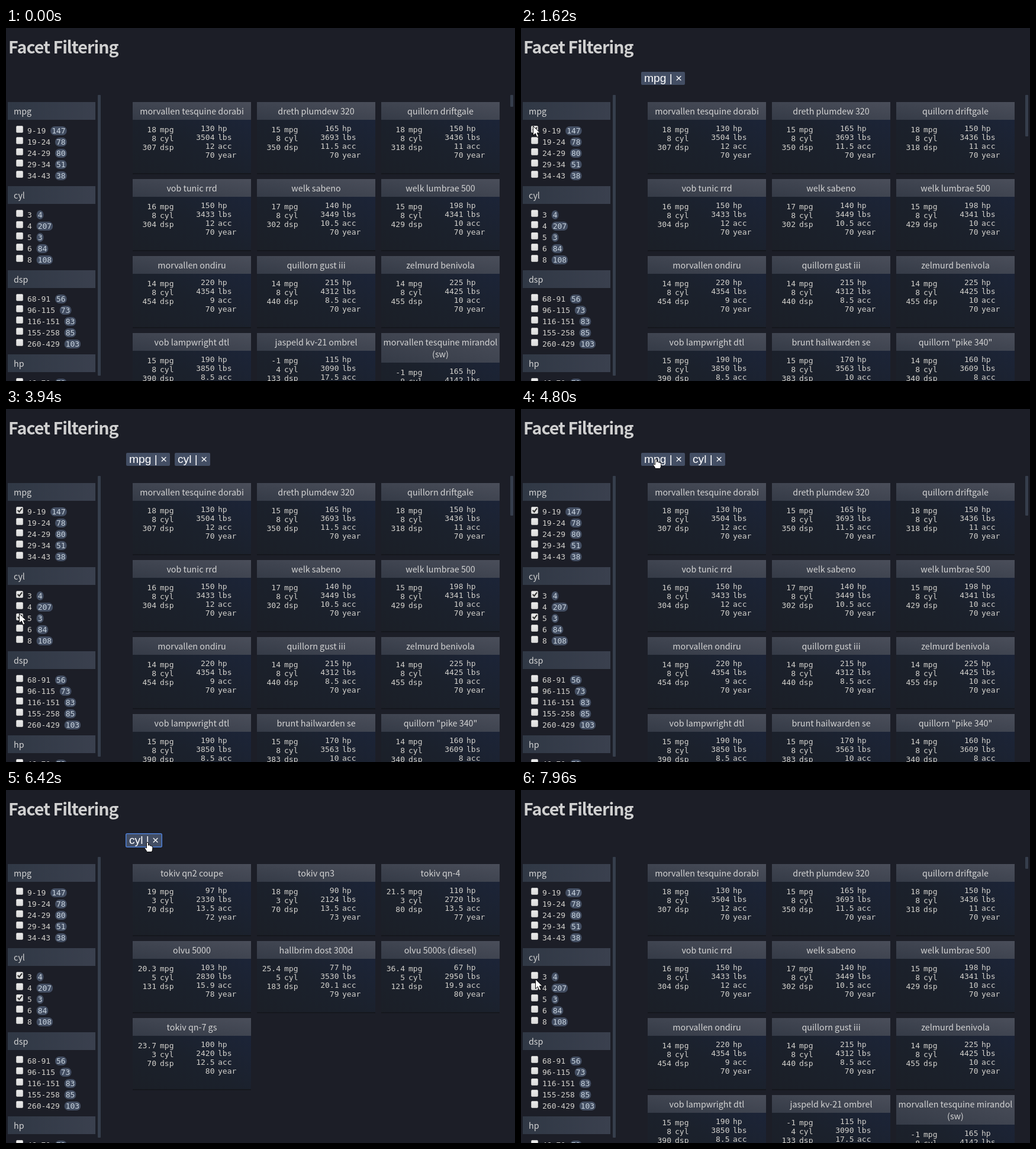
Write an HTML page that moves like this. It is 860 px wide and 596 px high and loops after 8 s.

```html
<!DOCTYPE html>
<html lang="en">
<head>
<meta charset="utf-8">
<title>Facet Filtering</title>
<style>
  html, body { margin: 0; width: 100%; height: 100%; overflow: hidden; background: #1c1e27; }
  svg { display: block; width: 860px; height: 596px; }
  text { fill: #d3d1cc; font: 13px "DejaVu Sans Mono", monospace; white-space: pre; }
  .title, .heading { font-family: "Noto Sans CJK JP", "Noto Sans CJK SC", "Noto Sans CJK", sans-serif; }
  .heading { font-size: 28.6px; font-weight: 700; letter-spacing: -1px; fill: #d0d0d0; }
  .title { font-size: 14.3px; fill: #d4d4d4; }
  .middle { text-anchor: middle; }
  .end { text-anchor: end; }
  .chip { font: 19.2px "Liberation Sans", Arial, sans-serif; fill: #fff; }
  .count { fill: #c8d3de; }
</style>
</head>
<body>
<svg id="stage" viewBox="0 0 860 596">
  <defs>
    <linearGradient id="side"><stop stop-color="#303845"/><stop offset="1" stop-color="#3a404e"/></linearGradient>
    <linearGradient id="head" x1="0" y1="1" x2="1" y2="0"><stop stop-color="#353b47"/><stop offset="1" stop-color="#4a4e5a"/></linearGradient>
    <linearGradient id="body" x1="0" y1="1" x2="1" y2="0"><stop stop-color="#1b1f27"/><stop offset=".45" stop-color="#1b212c"/><stop offset="1" stop-color="#1c253b"/></linearGradient>
    <linearGradient id="box" x2="0" y2="1"><stop stop-color="#ececec"/><stop offset="1" stop-color="#dadada"/></linearGradient>
  </defs>
</svg>
<script>
const LOOP = 8000;
const stage = document.getElementById("stage");
const timed = [];

function add(parent, tag, attrs, content) {
  const el = document.createElementNS("http://www.w3.org/2000/svg", tag);
  for (const key in attrs) el.setAttribute(key, attrs[key]);
  if (content !== undefined) el.textContent = content;
  return parent.appendChild(el);
}
const group = (attrs = {}) => add(stage, "g", attrs);
const rect = (g, x, y, width, height, fill, rx = 0) => add(g, "rect", { x, y, width, height, fill, rx });
const write = (g, x, y, content, style = "") => add(g, "text", { x, y, class: style }, content);

// Visible from one time to another; a window with from > to wraps around the loop.
function during(from, to, el = group()) {
  timed.push({ el, from, to });
  return el;
}

// Sidebar
const CHAR = 7.83;
function facet(index, name, rows) {
  const y = 125 + index * 142;
  rect(page, 3, y, 148, 30, "url(#side)");
  write(page, 13, y + 21, name, "title");
  rows.split(",").forEach((row, i) => {
    const [label, count] = row.split(" ");
    const base = y + 53 + i * 19;
    const pillX = 36 + (label.length + 1) * CHAR;
    add(page, "rect", { x: 17.5, y: base - 12.5, width: 11, height: 11, rx: 1.5, fill: "url(#box)", stroke: "#b9b9b9" });
    write(page, 36, base, label);
    rect(page, pillX, base - 12, count.length * CHAR + 4, 15, "#434e62", 7);
    write(page, pillX + 2, base, count, "count");
  });
}
const page = group();
write(page, 4, 43, "Facet Filtering", "heading");
facet(0, "mpg", "9-19 147,19-24 78,24-29 80,29-34 51,34-43 38");
facet(1, "cyl", "3 4,4 207,5 3,6 84,8 108");
facet(2, "dsp", "68-91 56,96-115 73,116-151 83,155-258 85,260-429 103");
facet(3, "hp", "46-70 73");
rect(page, 155, 113, 5, 474, "#363e4c", 1);

function tick(y, from, to) {
  add(during(from, to), "path", { d: `M19.8 ${y + 6}l2.6 2.7l4.6-6`, fill: "none", stroke: "#303030", "stroke-width": 2.1 });
}
tick(165, 1620, 5180);
tick(307, 2930, 7580);
tick(345, 3940, 7580);

// Result cards: "title / second line|mpg cyl dsp|hp lbs acc year"
function card(g, slot, spec) {
  const [name, left, right] = spec.split("|");
  const lines = name.split(" / ");
  const x = 214 + (slot % 3) * 210;
  const y = 125 + Math.floor(slot / 3) * 130;
  const extra = (lines.length - 1) * 20;
  rect(g, x, y + 2, 200, 120 + extra, "#15171d");
  rect(g, x, y, 200, 120 + extra, "url(#body)");
  rect(g, x, y, 200, 30 + extra, "url(#head)");
  lines.forEach((line, i) => write(g, x + 100, y + 21 + i * 20, line, "title middle"));
  const column = (values, units, edge, unitX, top) => values.split(" ").forEach((value, i) => {
    const base = y + extra + top + i * 15;
    write(g, x + edge, base, value, "end");
    write(g, x + unitX, base, units[i]);
  });
  column(left, ["mpg", "cyl", "dsp"], 40, 46, 51);
  column(right, ["hp", "lbs", "acc", "year"], 138.5, 144, 49);
}
const cards = (g, first, specs) => specs.forEach((spec, i) => card(g, first + i, spec));

cards(during(7580, 5180), 0, [
  "morvallen tesquine dorabi|18 8 307|130 3504 12 70",
  "dreth plumdew 320|15 8 350|165 3693 11.5 70",
  "quillorn driftgale|18 8 318|150 3436 11 70",
  "vob tunic rrd|16 8 304|150 3433 12 70",
  "welk sabeno|17 8 302|140 3449 10.5 70",
  "welk lumbrae 500|15 8 429|198 4341 10 70",
  "morvallen ondiru|14 8 454|220 4354 9 70",
  "quillorn gust iii|14 8 440|215 4312 8.5 70",
  "zelmurd benivola|14 8 455|225 4425 10 70",
  "vob lampwright dtl|15 8 390|190 3850 8.5 70"
]);
cards(during(7580, 1620), 10, [
  "jaspeld kv-21 ombrel|-1 4 133|115 3090 17.5 70",
  "morvallen tesquine mirandol / (sw)|-1 8 350|165 4142 11.5 70"
]);
cards(during(1620, 5180), 10, [
  "brunt hailwarden se|15 8 383|170 3563 10 70",
  "quillorn \"pike 340\"|14 8 340|160 3609 8 70"
]);
cards(during(5180, 7580), 0, [
  "tokiv qn2 coupe|19 3 70|97 2330 13.5 72",
  "tokiv qn3|18 3 70|90 2124 13.5 73",
  "tokiv qn-4|21.5 3 80|110 2720 13.5 77",
  "olvu 5000|20.3 5 131|103 2830 15.9 78",
  "hallbrim dost 300d|25.4 5 183|77 3530 20.1 79",
  "olvu 5000s (diesel)|36.4 5 121|67 2950 19.9 80",
  "tokiv qn-7 gs|23.7 3 70|100 2420 12.5 80"
]);

// Scroll thumb shrinks as more rows match
const thumb = (height, from, to) => rect(during(from, to), 852, 113, 5, height, "#363e4c", 1);
thumb(20, 7580, 1620);
thumb(70, 1620, 2930);
thumb(69, 2930, 3940);
thumb(67, 3940, 5180);

// Active filter chips
function chip(name, x, width, from, to, focusFrom) {
  const g = during(from, to);
  rect(g, x, 74, width, 22, "#434e64", 2);
  write(g, x + 5, 91, `${name} | ×`, "chip");
  if (focusFrom) add(during(focusFrom, to), "rect", {
    x: x - .25, y: 73.75, width: width + .5, height: 22.5, rx: 2, fill: "none", stroke: "#4d7fd6", "stroke-width": 1.5
  });
}
chip("mpg", 203, 74, 1620, 5180, 5030);
chip("cyl", 285, 60, 2930, 5180);
chip("cyl", 203, 60, 5180, 7580, 6350);

// Pointer
const pointer = during(210, LOOP);
const outline = { fill: "#fff", stroke: "#0b0b0d", "stroke-width": 1, "stroke-linejoin": "round" };
const arrow = add(pointer, "path", { d: "M.5.5V16.5L4.3 13L7 19.3L9.8 18L7.2 12H12.2Z", ...outline });
const hand = add(pointer, "path", {
  d: "M-1.5 8V1Q-1.5-.7 0-.7T1.5 1V5Q3-.2 4.3 5.3Q6.2 4 6.8 6Q8.8 5 8.8 7.5V10Q8.8 13 7 15.5H-1Q-2-13 -1.5 8Z".replace("Q-2-13 -1.5 8", "Q-2 12.5-4.6 9.5Q-4.7 7-1.5 9"),
  ...outline
});

// Each move: start, end, number of steps, waypoints
const moves = [
  [210, 910, 10, [[718, 564], [420, 350], [120, 150], [2, 137], [20, 165]]],
  [1850, 2310, 7, [[20, 165], [15, 240], [20, 318]]],
  [3080, 3620, 8, [[20, 318], [20, 283], [21, 361], [22, 345]]],
  [4010, 4710, 10, [[22, 345], [120, 215], [226, 84]]],
  [4800, 4800, 1, [[226, 84], [228, 85]]],
  [5270, 5270, 1, [[228, 85], [228, 86]]],
  [5410, 5490, 2, [[228, 86], [230, 89]]],
  [6030, 6100, 2, [[230, 89], [229, 88]]],
  [6350, 6500, 3, [[229, 88], [267, 90]]],
  [6880, 7420, 8, [[267, 90], [140, 220], [22, 345]]],
  [7820, 7960, 3, [[22, 345], [26, 310], [24, 319]]]
];

function pointerAt(t) {
  const move = moves.filter(m => m[0] <= t).pop() || moves[0];
  const [start, end, steps, points] = move;
  const gap = (end - start) / Math.max(1, steps - 1);
  const step = gap ? Math.min(steps - 1, Math.floor((t - start + 1) / gap)) : 0;
  const u = move === moves[0] ? step / (steps - 1) : (step + 1) / steps;
  const along = u * u * (3 - 2 * u) * (points.length - 1);
  const i = Math.min(points.length - 2, Math.floor(along));
  return [0, 1].map(axis => points[i][axis] + (points[i + 1][axis] - points[i][axis]) * (along - i));
}

const visible = (el, on) => el.setAttribute("visibility", on ? "visible" : "hidden");

function draw(t) {
  for (const { el, from, to } of timed) {
    el.setAttribute("display", (from < to ? t >= from && t < to : t >= from || t < to) ? "inline" : "none");
  }
  const [x, y] = pointerAt(t);
  const overChip = y < 97 && x < 264;
  pointer.setAttribute("transform", `translate(${Math.round(x)} ${Math.round(y)})`);
  visible(arrow, !overChip);
  visible(hand, overChip);
}

const begin = performance.now();
function frame() {
  draw((performance.now() - begin) % LOOP);
  requestAnimationFrame(frame);
}
frame();
</script>
</body>
</html>
```
